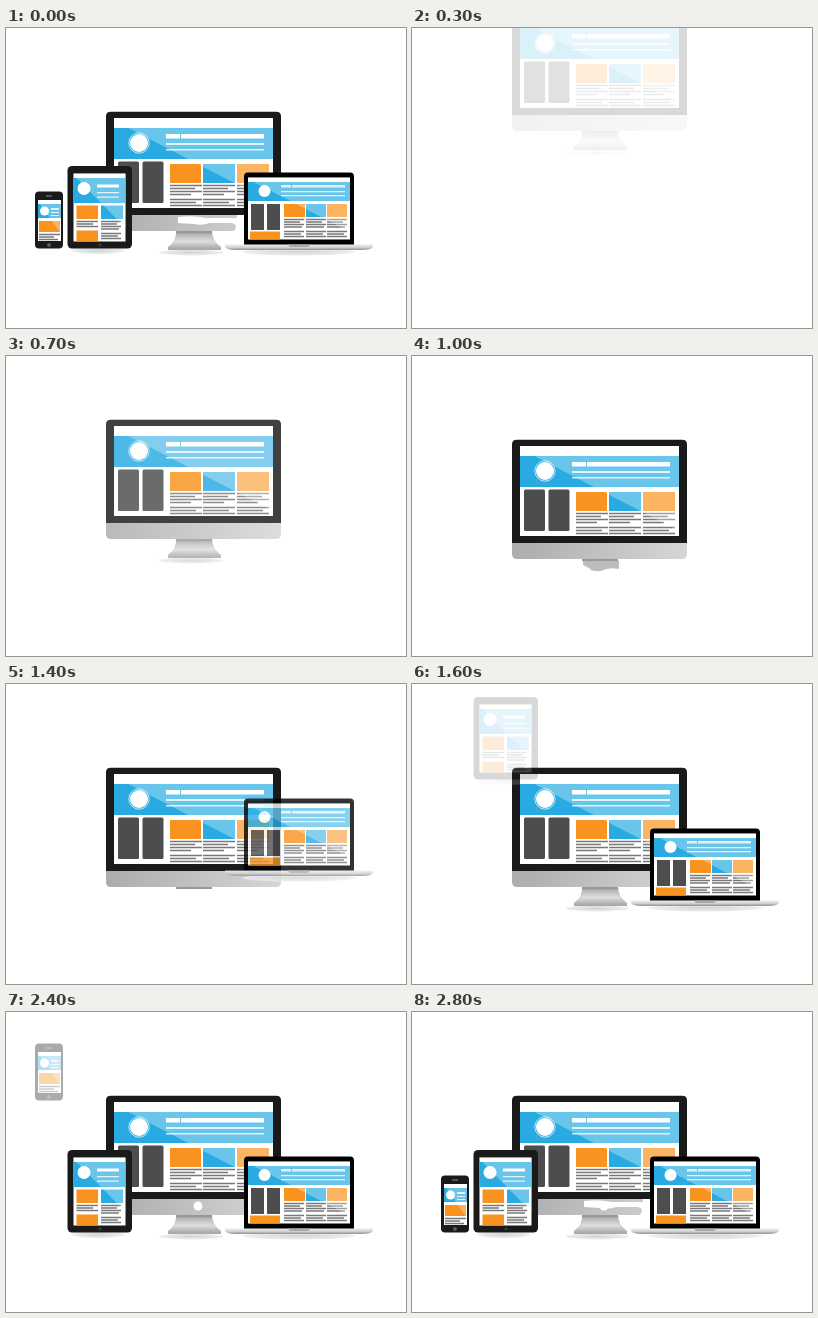
Animation, 400 px wide and 300 px high, one loop 6 s. Source, as an HTML page:

```html
<!DOCTYPE html>
<html lang="en">
<head>
<meta charset="utf-8">
<title>Responsive devices</title>
<style>
html, body { margin: 0; width: 100%; height: 100%; overflow: hidden; background: #fff; }
svg { display: block; width: 400px; height: 300px; }

/* A slight head start keeps every step clear of its boundary. */
.anim { animation: 6s step-end -5ms infinite; }
#monitor { animation-name: monitor; }
#laptop { animation-name: laptop; }
#tablet { animation-name: tablet; }
#phone { animation-name: phone; }
#stand { animation-name: stand; }
#stub { animation-name: stub; }
#badge { animation-name: badge; }
#glare { animation-name: glare; }

@keyframes monitor {
  0% { opacity: 1; transform: none; }
  1.6667% { opacity: 0; transform: translateY(-100px); }
  5% { opacity: .1667; transform: translateY(-100px); animation-timing-function: steps(5); }
  13.3333%, 100% { opacity: 1; transform: translateY(0); }
}
@keyframes laptop {
  0% { opacity: 1; transform: none; }
  1.6667% { opacity: 0; transform: translateY(-120px); }
  18.3333% { opacity: .2; transform: translateY(-120px); animation-timing-function: steps(4); }
  25%, 100% { opacity: 1; transform: translateY(0); }
}
@keyframes tablet {
  0% { opacity: 1; transform: none; }
  1.6667% { opacity: 0; transform: translateY(-125px); }
  26.6667% { opacity: .1667; transform: translateY(-125px); animation-timing-function: steps(5); }
  35%, 100% { opacity: 1; transform: translateY(0); }
}
@keyframes phone {
  0% { opacity: 1; transform: none; }
  1.6667% { opacity: 0; transform: translateY(-132px); }
  40% { opacity: .37; transform: translateY(-132px); animation-timing-function: steps(4); }
  46.6667%, 100% { opacity: 1; transform: translateY(0); }
}
@keyframes stand {
  0% { opacity: 1; }
  13.3333% { opacity: 0; }
  25%, 100% { opacity: 1; }
}
@keyframes stub {
  0% { opacity: 0; }
  13.3333% { opacity: 1; }
  18.3333%, 100% { opacity: 0; }
}
@keyframes badge {
  0% { opacity: 0; }
  28.3333%, 100% { opacity: 1; }
}
@keyframes glare {
  0% { opacity: 1; }
  1.6667% { opacity: 0; }
  46.6667%, 100% { opacity: 1; }
}

.body { fill: #1b1a1a; }
.blue { fill: #29abe2; }
.orange { fill: #f7931e; }
.panel { fill: #4d4d4f; }
.white { fill: #fff; }
.line { fill: #fff; opacity: .8; }
.gloss { fill: #fff; opacity: .3; }
.text { fill: none; stroke: #77787a; stroke-width: 1.3; }
.shadow { fill: url(#shade); }
</style>
</head>
<body>
<svg viewBox="0 0 400 300">
  <defs>
    <linearGradient id="chin">
      <stop offset="0" stop-color="#acacae"/>
      <stop offset="1" stop-color="#d6d6d8"/>
    </linearGradient>
    <linearGradient id="neck" x2="0" y2="1">
      <stop offset="0" stop-color="#8f8f91"/>
      <stop offset=".2" stop-color="#b8b8ba"/>
      <stop offset=".55" stop-color="#dededf"/>
      <stop offset=".85" stop-color="#b4b4b6"/>
      <stop offset="1" stop-color="#a4a4a6"/>
    </linearGradient>
    <linearGradient id="deck" x2="0" y2="1">
      <stop offset="0" stop-color="#ededee"/>
      <stop offset=".5" stop-color="#d4d4d6"/>
      <stop offset="1" stop-color="#8f8f91"/>
    </linearGradient>
    <radialGradient id="shade">
      <stop offset="0" stop-color="#d2d4d4"/>
      <stop offset="1" stop-color="#eef0f0"/>
    </radialGradient>
    <path id="copy" d="M0 .5h32M0 3.500h25M0 6.500h32M0 9.500h21M0 14.500h32M0 17.500h26M0 20.500h32"/>
    <path id="note" d="M0 .5h20M0 3h16M0 5.500h20M0 8h18M0 12.500h20M0 15h17M0 17.500h20"/>
  </defs>

  <g id="monitor" class="anim">
    <g id="stand" class="anim">
      <ellipse class="shadow" cx="185" cy="224.500" rx="32" ry="3"/>
      <path fill="url(#neck)" d="M170 203H206Q206 212 215 219V222H162V219Q171 212 170 203Z"/>
    </g>
    <path fill="#98989a" d="M170 203H206V205H170Z"/>
    <path id="stub" class="anim" fill="#bdbdbf" d="M171 205H207V213Q196 211 189 215Q180 216 177 212L171 209Z"/>
    <path fill="url(#chin)" d="M100 186H275V198Q275 203 270 203H105Q100 203 100 198Z"/>
    <circle id="badge" class="anim white" cx="192" cy="194" r="4.500"/>
    <path id="glare" class="anim white" d="M172 189Q186 187 200 190H231V187H243V203H228Q233 197 226 195H204Q196 198 188 196L172 195Z"/>
    <path class="body" d="M105 83.700H270Q275 83.700 275 88V187H100V88Q100 83.700 105 83.700Z"/>
    <path class="white" d="M108 90H267V180H108Z"/>
    <path class="blue" d="M108 100H267V131H108Z"/>
    <g class="panel">
      <rect x="112" y="133.500" width="21" height="41.500" rx="1.500"/>
      <rect x="136.500" y="133.500" width="21" height="41.500" rx="1.500"/>
    </g>
    <path class="orange" d="M164 136H195V155H164ZM231 136H263V155H231Z"/>
    <path class="blue" d="M197 136H229V155H197Z"/>
    <g class="text">
      <use href="#copy" x="164" y="157"/>
      <use href="#copy" x="197" y="157"/>
      <use href="#copy" x="231" y="157"/>
    </g>
    <path class="gloss" d="M108 92.500V90H267V175Z"/>
    <circle class="white" cx="133" cy="115" r="9"/>
    <circle cx="133" cy="115" r="10.200" fill="none" stroke="#fff" stroke-width=".7"/>
    <path class="white" d="M160 106H174V110.500H160ZM175 106H258V110.500H175Z"/>
    <path class="line" d="M160 115H258V117H160ZM160 121H258V122.500H160Z"/>
  </g>

  <g id="laptop" class="anim">
    <ellipse class="shadow" cx="293" cy="224" rx="57" ry="3.500"/>
    <path d="M242 144.500H344Q348 144.500 348 148.500V217H238V148.500Q238 144.500 242 144.500Z"/>
    <path class="white" d="M242 149.500H344V211.500H242Z"/>
    <path class="blue" d="M242 154H344V173H242Z"/>
    <path class="panel" d="M245 176H258V202H245ZM261 176H274V202H261Z"/>
    <path class="orange" d="M244 203.500H274V211.500H244ZM278 176H299V189H278ZM321 176H341V189H321Z"/>
    <path class="blue" d="M300 176H320V189H300Z"/>
    <g class="text">
      <use href="#note" x="278" y="191"/>
      <use href="#note" x="300" y="191"/>
      <use href="#note" x="321" y="191"/>
    </g>
    <path class="gloss" d="M242 151V149.500H344V204Z"/>
    <circle class="white" cx="258.500" cy="163" r="6"/>
    <path class="line" d="M275 157H285V159.500H275ZM286 157H339V159.500H286ZM275 163H339V164.200H275ZM275 167H339V168.200H275Z"/>
    <path fill="url(#deck)" d="M219 216.500H367V219Q365 222 356 222H230Q221 222 219 219Z"/>
    <path fill="#a9a9ab" d="M282 216.500H304Q303 219 301 219H285Q283 219 282 216.500Z"/>
  </g>

  <g id="tablet" class="anim">
    <ellipse class="shadow" cx="92" cy="222.500" rx="27" ry="3.500"/>
    <rect class="body" x="61.500" y="138" width="64.500" height="82.500" rx="4.500"/>
    <path class="white" d="M67.500 145.500H119.500V213.500H67.500Z"/>
    <path class="blue" d="M67.500 150H119.500V175H67.500Z"/>
    <path class="orange" d="M70.500 177.500H92V191H70.500ZM70.500 202.500H92V213.500H70.500Z"/>
    <path class="blue" d="M95 177.500H117V191H95Z"/>
    <g class="text">
      <path d="M70.500 193.500H92M70.500 196H87M70.500 198.500H92"/>
      <use href="#note" x="95" y="193"/>
    </g>
    <path class="gloss" d="M67.500 147V145.500H119.500V200Z"/>
    <circle class="white" cx="78" cy="160.500" r="6.500"/>
    <path class="white" d="M91 156.500H113V159.500H91Z"/>
    <path class="line" d="M91 164H113V165.300H91ZM91 168.500H113V169.800H91Z"/>
    <circle cx="94" cy="217" r="1.500" fill="#3c3c3e"/>
  </g>

  <g id="phone" class="anim">
    <rect class="body" x="29" y="163.500" width="28" height="57" rx="4"/>
    <path class="white" d="M32 172H55V213H32Z"/>
    <path class="blue" d="M32 176H55V190H32Z"/>
    <path class="orange" d="M33 193H54V204H33Z"/>
    <path class="text" d="M33 206.500H54M33 209H48M33 211.500H52"/>
    <path class="gloss" d="M32 173V172H55V206Z"/>
    <circle class="white" cx="38.500" cy="183" r="4.500"/>
    <path class="line" d="M45 180H53V182H45ZM45 184H53V185H45ZM45 187H53V188H45Z"/>
    <path d="M40 168H46" stroke="#8a8a8c"/>
    <circle cx="43" cy="217" r="2" fill="#58595b"/>
  </g>
</svg>
</body>
</html>
```
